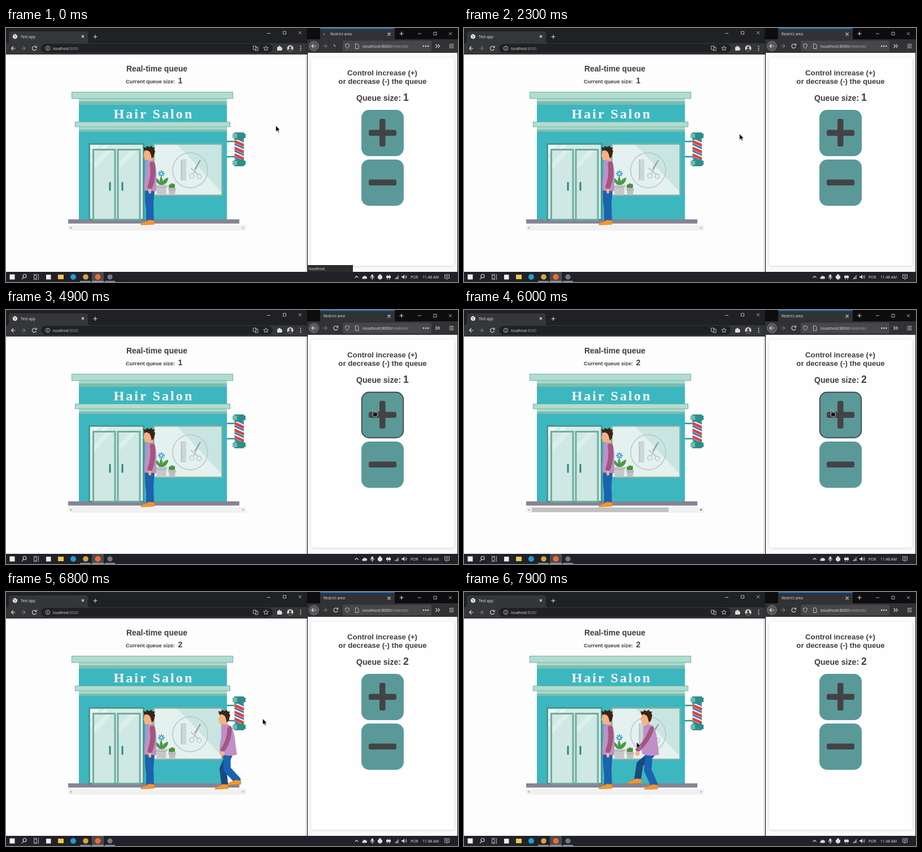
Animation, 800 px wide and 450 px high, one loop 8 s. Source, as an HTML page:

```html
<!DOCTYPE html>
<html lang="en">
<head>
<meta charset="utf-8">
<title>Real-time queue</title>
<style>
html, body { margin: 0; width: 100%; height: 100%; overflow: hidden; background: #fdfdfd; }
svg { display: block; width: 800px; height: 450px; }
text { font-family: "Open Sans", "Noto Sans", sans-serif; fill: #e4e4e6; font-size: 6.7px; }
.page text { font-family: "Liberation Sans", Arial, sans-serif; font-weight: bold; fill: #3d3d3f; }
.page .sign { font: bold 24px "Liberation Serif", serif; fill: #fff; letter-spacing: 3.1px; }
.mid { text-anchor: middle; }
.ico { fill: none; stroke: #dcdce0; stroke-width: 1.1; }
.thin { stroke-width: .8; }
.lite { fill: #dcdce0; }
.beam { fill: #b3dcd0; stroke: #6cb5a5; }
.pale { fill: #a9d9cc; }
.shade { fill: #7dbcae; }
.key { fill: #5b9999; }
.bar { fill: #434345; }
.skin { fill: #f6b184; }
.hair { fill: #3b2414; }
.vest { fill: #c08fc8; }
.limb { fill: none; stroke-linejoin: round; stroke-linecap: round; }
.sleeve { stroke: #a2567f; stroke-width: 8; }
.near { stroke: #1b62b0; }
.far { stroke: #174a80; }
.shoe { fill: #f2962f; stroke: #c9701f; stroke-width: .5; }
</style>
</head>
<body>
<svg viewBox="0 0 800 450">
<defs>
  <clipPath id="shopClip"><rect x="110" y="105" width="315" height="245"/></clipPath>
  <clipPath id="poleClip"><rect x="404.500" y="196" width="16.500" height="39"/></clipPath>
  <filter id="soft" x="-10%" y="-10%" width="120%" height="120%"><feGaussianBlur stdDeviation="2.5"/></filter>
  <g id="head">
    <path class="skin" d="M-7 215L-9 224L-10 227L-8 228.500L-8 233Q-5 236-1 234L-1 239L7 239L7 215Z"/>
    <path class="hair" d="M-8 218L-10 211L-5 212L-4 209L1 211L5 208.500L6 211.500L11 212L9 215L11 218L8.500 228L5 231L3 223L1 219L-4 216.500Z"/>
  </g>
  <path id="shoe" d="M-12 2Q-9-1-4-2L2-5L11-4Q13 0 11 3L-11 4Q-13 4-12 2Z"/>
</defs>

<!-- left browser -->
<rect width="533" height="28" fill="#202124"/>
<path d="M2 27Q5 26 5 23V10Q5 6 9 6H141Q145 6 145 10V23Q145 26 148 27H533V47H0V27Z" fill="#35363a"/>
<rect x="62" y="28" width="410" height="16" rx="8" fill="#202124"/>
<circle cx="16" cy="15" r="4.200" fill="#e8eaed"/>
<path d="M13 13l3 1 1 2-2 2M17 11l2 2" stroke="#55585c" fill="none"/>
<text x="26" y="17.600" font-size="6.800">Test app</text>
<path class="ico" d="M134 13l4 4m0-4l-4 4M158 12v7m-3.500-3.500h7"/>
<path class="ico thin" d="M462 9.500h6M490.500 6h5v5h-5zM518 6l5 5m0-5l-5 5"/>
<path class="ico" d="M16.500 36H9.500m3.500-3.500L9.500 36l3.500 3.500"/>
<path class="ico" d="M27 36h7m-3.500-3.500L34 36l-3.500 3.500" opacity=".4"/>
<path class="ico" d="M53 33.500a3.700 3.700 0 1 0 .7 3.500M54 31.500v3h-3"/>
<circle class="ico thin" cx="74" cy="36" r="3.800"/><path class="ico" d="M74 35.500v2.500M74 33.500v1"/>
<text x="83" y="38.600" font-size="7.700">localhost<tspan fill="#9aa0a6">:8000</tspan></text>
<path class="ico thin" d="M437.500 32h5v6h-5zM441 34h5v6h-5v-2"/>
<path class="ico thin" d="M460 31.700l1.200 2.900 3.100.2-2.400 2 .8 3-2.700-1.700-2.700 1.700.8-3-2.400-2 3.100-.2z"/>
<path class="lite" d="M480 33.500h2.200q.1-2 1.800-2 1.500 0 1.600 2H488v2.300q1.300.2 1.300 1.400t-1.300 1.400V40h-8z"/>
<circle cx="503" cy="36" r="5.500" fill="#d9d6d0"/>
<path d="M499 40q0-3.500 4-3.500t4 3.500q-4 3-8 0z" fill="#454545"/><circle cx="503" cy="34.500" r="2.200" fill="#5c4a40"/>
<path class="lite" d="M520.700 31.500h1.700v1.700h-1.700zm0 3.500h1.700v1.700h-1.700zm0 3.500h1.700v1.700h-1.700z"/>

<g class="page">
  <rect y="47" width="533" height="385" fill="#fdfdfd"/>
  <text class="mid" x="267" y="77" font-size="14" style="font-size:14px">Real-time queue</text>
  <text x="212" y="97.700" style="font-size:9.320px">Current queue size:</text>
  <text class="count" x="304.500" y="98" style="font-size:14px">1</text>

  <!-- shop -->
  <rect x="129" y="125" width="262" height="215" fill="#3cb7bf"/>
  <rect class="pale" x="129" y="125" width="262" height="6"/>
  <rect class="shade" x="129" y="130" width="262" height="6"/>
  <rect class="beam" x="116.500" y="113.500" width="285" height="11.500"/>
  <text class="sign" x="190.500" y="160">Hair Salon</text>
  <rect class="pale" x="129" y="175" width="262" height="5"/>
  <rect class="shade" x="129" y="180" width="262" height="4"/>
  <rect class="beam" x="122.500" y="166.500" width="274" height="8.500"/>
  <rect x="110" y="339" width="303" height="7.500" fill="#858494"/>

  <rect x="147.500" y="205.500" width="96" height="134" fill="#d6ebe6" stroke="#3f918a" stroke-width="2.500"/>
  <path d="M149 207h18l-18 18zM174 207h8l-33 33v-8z" fill="#ecf6f3"/>
  <g fill="#cfe8e3" stroke="#6fac9f" stroke-width="3">
    <rect x="154.500" y="215.500" width="38.500" height="124"/>
    <rect x="198" y="215.500" width="39" height="124"/>
  </g>
  <path d="M156 238l20-21h12l-32 34zM200 238l20-21h12l-32 34z" fill="#dcefeb"/>
  <path d="M184 274v13M206 274v13" stroke="#2f857e" stroke-width="3" stroke-linecap="round"/>

  <rect x="261.500" y="205.500" width="121" height="91" fill="#e3f1ef"/>
  <path d="M303 206H382V291Z" fill="#c9e5e2"/>
  <rect x="261.500" y="205.500" width="121" height="91" fill="none" stroke="#80aea4" stroke-width="2.500"/>
  <g fill="none" stroke="#bcc5c5">
    <circle cx="326" cy="252" r="31" stroke-width="1.500"/>
    <path d="M311 233v37" stroke-width="3"/>
    <path d="M316 233v37" stroke-width="6" stroke-dasharray="1.500 1"/>
    <path d="M344 234L332 258M327 248L341 260" stroke-width="2"/>
    <circle cx="329" cy="262" r="4" stroke-width="1.500"/><circle cx="342" cy="263" r="4" stroke-width="1.500"/>
  </g>
  <path d="M344 234L334 250" stroke="#859292" stroke-width="1.500"/>
  <path d="M275 278V258" stroke="#58a05a" stroke-width="1.500"/>
  <path d="M275 279Q265 276 264 265Q272 268 275 279Q277 267 287 265Q287 276 275 279Q270 270 274 263Q280 270 275 279" fill="#4c9a45"/>
  <path d="M275 252v12m-6-6h12m-10-4l8 8m0-8l-8 8" stroke="#2e9cc9" stroke-width="1.800"/>
  <circle cx="275" cy="258" r="2" fill="#e9f4f8"/>
  <path d="M264 278h22v4h-2l-1 14h-16l-1-14h-2z" fill="#c7c7ca"/><path d="M266 282h18" stroke="#a5a5aa"/>
  <path d="M293.500 284v-7m-3.500 5v-3m7 3v-4" stroke="#4d8f3c" stroke-width="4" stroke-linecap="round"/>
  <path d="M287 283.500h14v3h-1l-1 9.500h-10l-1-9.500h-1z" fill="#c0c0c4"/><path d="M288 287h12" stroke="#a0a0a5"/>

  <path d="M391 201h14M391 228h14" stroke="#25968f" stroke-width="2.500"/>
  <rect x="404.500" y="196" width="16.500" height="39" fill="#f2f2f2"/>
  <g id="stripes" clip-path="url(#poleClip)" stroke-width="5"></g>
  <path d="M404 185h17v2h3v8h-3v3h-17v-3h-3v-8h3zM404 233h17v2h3v8h-3v2h-17v-2h-3v-8h3z" fill="#2c8f8a"/>
  <path d="M401 187h8v8h-8zM401 235h8v8h-8z" fill="#71b9ae"/>

  <!-- scrollbar -->
  <rect x="110" y="349" width="315" height="10" fill="#f1f1f1"/>
  <rect id="thumb" x="120" y="350" width="280" height="8" fill="#c1c1c1"/>
  <path d="M116 352l-3 2 3 2z" fill="#a3a3a3"/>
  <path id="more" d="M418.500 352l3 2-3 2z"/>

  <!-- people -->
  <g transform="translate(253)">
    <path class="skin" d="M-2 282h6l-1 11-3 1-2-5z"/>
    <path fill="#1b62b0" d="M-7 286H10L8 312L9 344H-5L-5 322Q-8 304-7 286Z"/>
    <use href="#shoe" class="shoe" x="-2" y="345"/>
    <use href="#head"/>
    <path class="vest" d="M-6 237Q2 232 10 237Q14 250 13 268L13 289L-8 288Q-9 272-6 260Z"/>
    <path class="limb sleeve" d="M6 241Q9 262 2 281" style="stroke-width:9"/>
    <path class="skin" d="M-1 285h5v7l-3 2-2-4z"/>
  </g>
  <g clip-path="url(#shopClip)">
    <g id="walker">
      <path id="farArm" class="limb sleeve"/><circle id="farHand" class="skin" r="4"/>
      <path id="farLeg" class="limb far" stroke-width="12"/><use id="farShoe" href="#shoe" class="shoe"/>
      <path id="nearLeg" class="limb near" stroke-width="13"/><use id="nearShoe" href="#shoe" class="shoe"/>
      <use href="#head"/>
      <path class="vest" d="M-5 237Q4 232 12 237Q19 248 20 266L23 288Q8 293-7 287Q-9 274-5 258Z"/>
      <path id="nearArm" class="limb sleeve"/><circle id="nearHand" class="skin" r="4"/>
    </g>
  </g>
</g>

<!-- right browser -->
<rect x="530" y="0" width="3" height="432" fill="#000" opacity=".1"/>
<rect x="533" width="267" height="432" fill="#0d0d0f"/>
<rect x="556" width="132" height="20" fill="#323234"/>
<rect x="556" width="132" height="1.300" fill="#0a84ff"/>
<rect x="533" y="20" width="267" height="24" fill="#323234"/>
<rect x="596" y="22.500" width="157" height="19" rx="2" fill="#474749"/>
<text id="tabName" x="562" y="13" style="font-size:6.500px">Restrict area</text>
<circle id="spinner" cx="563" cy="11" r="1.200" fill="#3ba0ff"/>
<path class="ico" d="M675.500 8.500l5 5m0-5l-5 5M700 6.500v7m-3.500-3.500h7"/>
<path class="ico thin" d="M729 10h6M757 7.500h5v5h-5zM784 7.500l5 5m0-5l-5 5"/>
<circle cx="545" cy="32" r="8.500" fill="#55555a" stroke="#75757a"/>
<path class="ico" d="M549 32h-8m3.500-3.500L541 32l3.500 3.500"/>
<path class="ico" d="M560 32h8m-3.500-3.500L568 32l-3.500 3.500" opacity=".4"/>
<path id="reload" class="ico" d="M586.500 29.500a3.700 3.700 0 1 0 .7 3.500M587.500 27.500v3h-3"/>
<path id="busy" class="ico" d="M580 29l3 4"/>
<path class="ico thin" d="M604 28l3.500 1.200q0 5-3.500 7-3.500-2-3.500-7zM618.500 28h3.500l2 2v6.500h-5.500z"/>
<text x="631" y="34.700" style="font-size:7.570px" fill="#f4f4f4"><tspan>localhost:8000</tspan><tspan fill="#b1b1b3">/restrict/</tspan></text>
<path class="lite" d="M738 31h2.200v2.200H738zm4 0h2.200v2.200H742zm4 0h2.200v2.200H746z"/>
<path class="ico" d="M760.500 29l3 3-3 3m4-6l3 3-3 3M784.500 29h8m-8 3h8m-8 3h8"/>
<g class="page">
  <rect x="534" y="44" width="265" height="388" fill="#fbfbfc"/>
  <rect x="540" y="54" width="253" height="368" rx="4" fill="#bbb" opacity=".55" filter="url(#soft)"/>
  <rect x="540" y="53" width="253" height="368" rx="4" fill="#fefefe"/>
  <text class="mid" x="666" y="84" style="font-size:13.150px">Control increase (+)</text>
  <text class="mid" x="666.500" y="99" style="font-size:13.150px">or decrease (-) the queue</text>
  <text x="620" y="129" style="font-size:14.100px">Queue size:</text>
  <text class="count" x="703" y="129" style="font-size:17.500px">1</text>
  <rect class="key" x="629" y="145" width="75" height="82" rx="14"/>
  <rect id="ring" x="629.700" y="145.700" width="73.600" height="80.600" rx="13" fill="none" stroke="#384143" stroke-width="1.700"/>
  <rect class="bar" x="661" y="161" width="10.500" height="49" rx="3"/>
  <rect class="bar" x="642" y="180.500" width="49" height="10.500" rx="3"/>
  <rect class="key" x="629" y="233" width="75" height="82" rx="14"/>
  <rect class="bar" x="642" y="268.500" width="49" height="10.500" rx="3"/>
</g>
<g id="status"><rect x="533" y="420" width="81" height="12" fill="#2c2c30"/><text x="536" y="429.300" style="font-size:6.800px">localhost</text></g>

<!-- taskbar -->
<rect y="432" width="800" height="18" fill="#212129"/>
<rect x="152" y="432" width="21" height="18" fill="#4b4b53"/>
<path d="M131 449h19M152 449h21M175 449h18" stroke="#9fb3c8" stroke-width="1.600"/>
<rect x="6.500" y="436.500" width="9" height="9" fill="#f2f2f4"/>
<circle class="ico" cx="33" cy="439.500" r="3"/><path class="ico" d="M31 442l-3 3.500"/>
<path class="ico thin" d="M49.500 438.500h5v5h-5zM48.500 436.500h7M48.500 445.500h7M57.500 436v10"/>
<rect x="71" y="437" width="8.500" height="8.500" fill="#eeeef0"/>
<rect x="92" y="437" width="10" height="8" fill="#f4c64e"/>
<circle cx="119" cy="441" r="5" fill="#259bd0"/>
<circle cx="141" cy="441" r="4.800" fill="#d9a33a"/>
<circle cx="162.500" cy="441" r="5" fill="#f26b2c"/>
<circle cx="184" cy="441" r="4.600" fill="#77777d"/>
<path class="ico" d="M617.500 442.500l3-3 3 3"/>
<path class="lite" d="M631 444.500q-2-2.500 1-3.500 1-3 4-1.500 3 .5 3 3 0 2-2 2zM646.500 437h3.500v5h-3.500zM648 443h1v3h-1zM658 439h8v5h-8zM660 436.500h4v9h-4zM673 439h8v4h-8zM700 440h2l3-3v8l-3-3h-2z"/>
<path class="ico thin" d="M645 440q0 4 3.300 4t3.200-4M675 437v9M679 437v9M706.500 439q1.500 2 0 4M708 437.500q2.500 3.500 0 7"/>
<path d="M688 445l7-8v8z" fill="#82828a"/><path class="ico thin" d="M688.500 445l3-3"/>
<text x="716" y="443.600">POR</text>
<text x="737" y="443.600">11:48 AM</text>
<path class="ico thin" d="M776.500 437h8v6.500h-3l-1.500 2v-2h-3.500zM778.500 439.300h4M778.500 441.300h4"/>

<g id="mouse">
  <path id="arrow" d="M0 0V10.500L2.500 8.300L4.300 12L6 11.200L4.300 7.600H7.500Z" fill="#000" stroke="#fff" stroke-width=".6"/>
  <path id="hand" d="M-1 .5Q0-1 1 .5V4L6 5Q7 5.500 6.700 8L5.500 12H0L-3 7.500Q-3 6-1 7Z" fill="#151515" stroke="#fff" stroke-width=".7"/>
</g>
</svg>
<script>
const LOOP = 8000, FRAME = 100, LOADED = 300, ADDED = 6000;
const el = id => document.getElementById(id);
const show = (id, on) => { el(id).style.display = on ? "" : "none"; };
const set = (id, attrs) => { for (const k in attrs) el(id).setAttribute(k, attrs[k]); };

// rows: time, x, y
const mousePath = [
  [0, 477.5, 173], [1100, 479.5, 174], [1800, 485, 183], [3300, 493, 197], [3600, 493, 197],
  [4000, 270, 278], [4200, 272, 278], [4500, 480, 224], [4900, 651, 177], [6000, 651, 177],
  [6500, 540, 198], [7200, 340, 260], [7900, 305.5, 266]
];
// rows: step phase, shoe x, shoe y, relative to the head
const stepPath = [
  [0, -26, 338], [.07, -14, 345], [.5, 12, 346], [.65, 28, 343], [.8, 12, 335], [.92, -16, 334], [1, -26, 338]
];

function along(rows, t) {
  let i = 1;
  while (i < rows.length - 1 && rows[i][0] < t) i++;
  const a = rows[i - 1], b = rows[i];
  const u = Math.min(1, (t - a[0]) / (b[0] - a[0]));
  return [a[1] + (b[1] - a[1]) * u, a[2] + (b[2] - a[2]) * u];
}

function leg(side, phase, hipX) {
  const [x, y] = along(stepPath, phase - Math.floor(phase));
  const hipY = 288, ax = x + 5, ay = y - 5, bone = 29.5;
  const dx = ax - hipX, dy = ay - hipY, d = Math.hypot(dx, dy);
  const bend = Math.sqrt(Math.max(0, bone * bone - d * d / 4));
  const kx = hipX + dx / 2 - dy / d * bend * .55;
  const ky = hipY + dy / 2 + dx / d * bend * .55;
  set(side + "Leg", { d: `M${hipX} ${hipY}L${kx} ${ky}L${ax} ${ay}` });
  set(side + "Shoe", { transform: `translate(${x} ${y})` });
}

function arm(side, phase, shoulderX) {
  const x = -1 + 14 * Math.cos(phase * 2 * Math.PI);
  set(side + "Arm", { d: `M${shoulderX} 242Q${(shoulderX + x) / 2 + 5} 264 ${x} 279` });
  set(side + "Hand", { cx: x - 1, cy: 286 });
}

function drawWalker(t) {
  const left = 1 - (t - ADDED) / 2600;
  const x = 311 + 156 * left * left;
  const phase = (t - 7200) / 1550;
  set("walker", { transform: `translate(${x})` });
  leg("far", phase + .5, 9);
  leg("near", phase, 5);
  arm("far", phase + .5, 2);
  arm("near", phase, 10);
  return x + 27;
}

function draw(now) {
  const t = Math.floor(now % LOOP / FRAME) * FRAME;
  const loading = t < LOADED, added = t >= ADDED;
  ["spinner", "busy", "status"].forEach(id => show(id, loading));
  show("reload", !loading);
  set("tabName", { x: loading ? 574 : 562 });

  const count = added ? "2" : "1";
  document.querySelectorAll(".count").forEach(n => { n.textContent = count; });
  show("walker", added);
  const right = added ? drawWalker(t) : 0;
  const overflow = right > 425;
  show("thumb", overflow);
  if (overflow) set("thumb", { width: 295 * 315 / (right - 110) });
  set("more", { fill: overflow ? "#505050" : "#a3a3a3" });

  const [x, y] = along(mousePath, t);
  const hover = x > 629 && x < 704 && y > 145 && y < 227;
  set("mouse", { transform: `translate(${x} ${y})` });
  show("hand", hover);
  show("arrow", !hover);
  show("ring", hover);
}

let stripes = "";
for (let i = 0; i < 5; i++) {
  const y = 188 + i * 12;
  stripes += `<path d="M403 ${y}l20 9" stroke="#d9483b"/><path d="M403 ${y + 5}l20 9" stroke="#3a6fc0" stroke-width="3"/>`;
}
el("stripes").innerHTML = stripes;

function tick() {
  draw(performance.now());
  requestAnimationFrame(tick);
}
tick();
</script>
</body>
</html>
```
